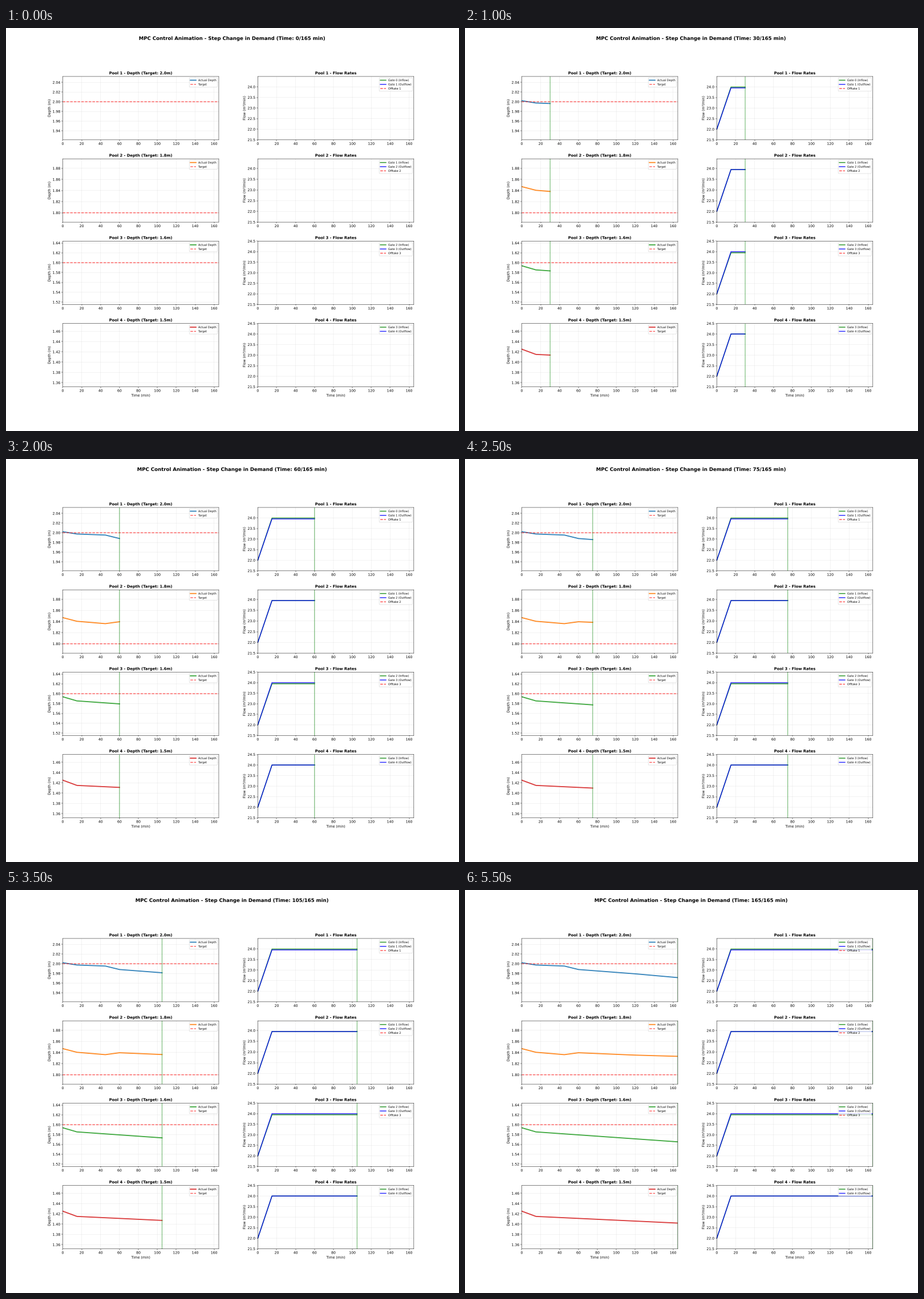
A matplotlib script that plays this animation: 794x706 px, repeating every 6000 ms.

```python
import matplotlib.pyplot as plt
import numpy as np
from matplotlib import patheffects
from matplotlib.animation import FuncAnimation

# Outline text and unsnapped lines keep fine detail at sub-pixel positions.
plt.rcParams.update({
    "font.family": "DejaVu Sans",
    "text.hinting": "none",
    "path.snap": False,
    "path.effects": [patheffects.Normal()],
})

WIDTH, HEIGHT, DPI = 794, 706, 44.125
STEP, T_END = 15, 165
TIMES = np.arange(0, T_END + 1, STEP)
START_FLOW = 22.0
STEADY_FLOWS = [23.99, 23.95, 23.95, 24.0, 24.0]  # per gate

# target depth, starting depth, later loss, weight of the surge between pools
POOLS = [
    (2.0, 2.0022, 0.0260, 1.0),
    (1.8, 1.8471, 0.0073, -0.9),
    (1.6, 1.5938, 0.0202, 0),
    (1.5, 1.4253, 0.0130, 0),
]


def pool_depth(index, start, loss, surge):
    """A quick drop in the first step, then a steady loss with a surge around t = 50."""
    drop = 0.0048 + 0.0018 * index
    first = np.clip(TIMES / STEP, 0, 1)
    later = np.clip((TIMES - STEP) / (T_END - STEP), 0, 1)
    wave = np.interp(TIMES, [15, 45, 60, 120], [0, 0.0031, -0.0015, 0])
    return start - drop * first - loss * later + surge * wave


def gate_flow(gate):
    return np.where(TIMES == 0, START_FLOW, STEADY_FLOWS[gate])


fig, axes = plt.subplots(4, 2, dpi=DPI,
                         figsize=((WIDTH + 0.001) / DPI, (HEIGHT + 0.001) / DPI))
dx, dy = 0.22 / WIDTH, 0.22 / HEIGHT
fig.subplots_adjust(left=0.125 + dx, right=0.9 + dx, bottom=0.11 - dy, top=0.88 - dy,
                    wspace=0.25, hspace=0.3)
heading = fig.suptitle("", fontsize=14, fontweight="bold")

series = []   # (line, values over TIMES)
cursors = []


def add_series(ax, values, **style):
    line, = ax.plot([], [], **style)
    series.append((line, values))


def finish(ax, title, ylabel, low, high):
    cursors.append(ax.axvline(0, color="green", alpha=0.5, lw=2))
    ax.set_title(title, fontsize=11, fontweight="bold")
    ax.set_ylabel(ylabel)
    ax.set_xlim(0, T_END)
    ax.set_ylim(low, high)
    ax.grid(True, alpha=0.3)
    ax.legend(loc="upper right", fontsize=8)


for i, (target, start, loss, surge) in enumerate(POOLS):
    pool = i + 1
    depth_ax, flow_ax = axes[i]

    depth = pool_depth(i, start, loss, surge)
    add_series(depth_ax, depth, color=f"C{i}", lw=3, alpha=0.9, label="Actual Depth")
    depth_ax.axhline(target, color="red", ls="--", lw=2, alpha=0.7, label="Target")
    finish(depth_ax, f"Pool {pool} - Depth (Target: {target}m)", "Depth (m)",
           depth.min() - 0.05, depth.max() + 0.05)

    inflow, outflow = gate_flow(i), gate_flow(pool)
    add_series(flow_ax, inflow, color="green", lw=2.5, alpha=0.8, label=f"Gate {i} (Inflow)")
    add_series(flow_ax, outflow, color="blue", lw=2.5, alpha=0.8,
               label=f"Gate {pool} (Outflow)")
    if pool < len(POOLS):
        flow_ax.plot([], [], color="red", ls="--", lw=2, alpha=0.8, label=f"Offtake {pool}")
    finish(flow_ax, f"Pool {pool} - Flow Rates", "Flow (m³/min)",
           START_FLOW - 0.5, max(inflow.max(), outflow.max()) + 0.5)

for ax in axes[-1]:
    ax.set_xlabel("Time (min)")


def update(frame):
    now = TIMES[frame]
    heading.set_text(f"MPC Control Animation - Step Change in Demand (Time: {now}/{T_END} min)")
    for line, values in series:
        line.set_data(TIMES[:frame + 1], values[:frame + 1])
        line.set_visible(frame > 0)
    for cursor in cursors:
        cursor.set_xdata([now, now])
        cursor.set_visible(frame > 0)
    return [heading]


anim = FuncAnimation(fig, update, frames=len(TIMES), interval=500, repeat=True,
                     repeat_delay=0, blit=False)
plt.show()
```
